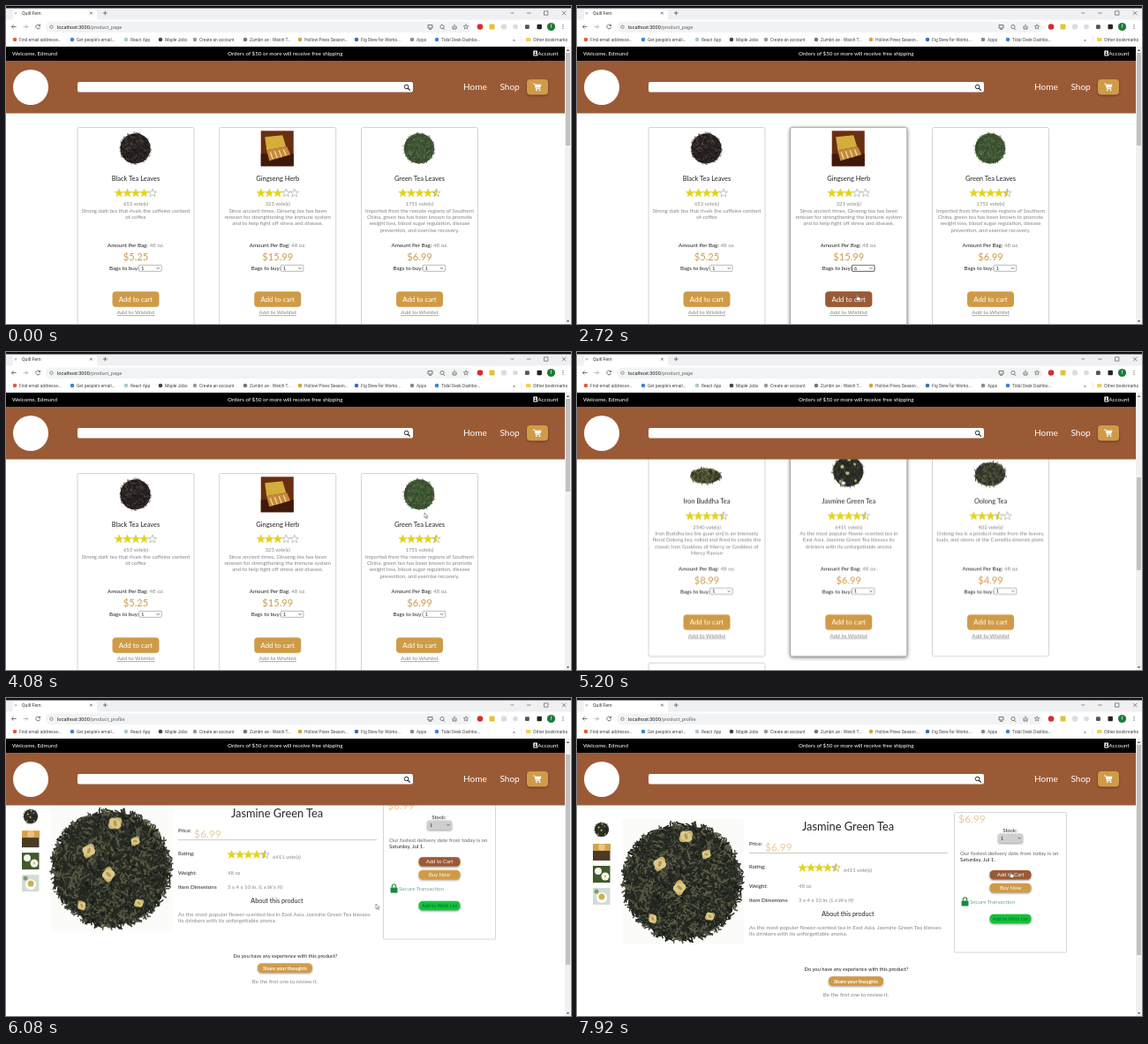
Write an HTML page that moves like this. It is 640 by 360 pixels and loops after 8 s.

```html
<!DOCTYPE html>
<html lang="en">
<head>
<meta charset="utf-8">
<title>Tea shop</title>
<style>
html, body { margin: 0; width: 100%; height: 100%; overflow: hidden; background: #fff; }
svg { display: block; width: 100vw; height: 100vh; font-family: Lato, sans-serif; }
.ui { font-family: Roboto, sans-serif; }
.shadow { filter: drop-shadow(0 1.2px 1.2px #0006); }
.lift { filter: drop-shadow(0 1px 2px #0008); }

/* 1% of the loop is 80 ms */
.scroll, .thumb, #cursor { animation: 8s linear infinite; }
.shop, .profile, .hover, .pick, .press, .arrow, .hand { animation: 8s step-end infinite; opacity: 0; }
.shop { animation-name: shop; }
.profile { animation-name: profile; }
.shop .scroll { animation-name: shop-scroll; }
.shop .thumb { animation-name: shop-thumb; }
.profile .scroll { animation-name: profile-scroll; }
.profile .thumb { animation-name: profile-thumb; }
.hover.ginseng { animation-name: hover-ginseng; }
.hover.green { animation-name: hover-green; }
.hover.jasmine { animation-name: hover-jasmine; }
.pick { animation-name: pick; }
.press { animation-name: press; }
.arrow { animation-name: arrow; }
.hand { animation-name: hand; }
#cursor { animation-name: cursor; }

@keyframes shop { 0% { opacity: 1 } 68%, 100% { opacity: 0 } }
@keyframes profile { 0% { opacity: 0 } 68%, 100% { opacity: 1 } }
@keyframes shop-scroll {
  0%, 54% { transform: translateY(0); animation-timing-function: ease-in-out }
  63%, 100% { transform: translateY(-266.5px) }
}
@keyframes shop-thumb {
  0%, 54% { transform: translateY(0); animation-timing-function: ease-in-out }
  63%, 100% { transform: translateY(89px) }
}
@keyframes profile-scroll {
  0%, 73% { transform: translateY(-80px) }
  76% { transform: translateY(-15px); animation-timing-function: ease-out }
  79%, 100% { transform: translateY(0) }
}
@keyframes profile-thumb {
  0%, 73% { transform: translateY(60px) }
  76% { transform: translateY(11px); animation-timing-function: ease-out }
  79%, 100% { transform: translateY(0) }
}
@keyframes hover-ginseng { 0% { opacity: 0 } 11% { opacity: 1 } 46%, 100% { opacity: 0 } }
@keyframes hover-green {
  0% { opacity: 0 } 8% { opacity: 1 } 9% { opacity: 0 }
  52% { opacity: 1 } 57%, 100% { opacity: 0 }
}
@keyframes hover-jasmine { 0% { opacity: 0 } 62%, 100% { opacity: 1 } }
@keyframes pick { 0% { opacity: 0 } 28% { opacity: 1 } 42%, 100% { opacity: 0 } }
@keyframes press { 0% { opacity: 0 } 32.5% { opacity: 1 } 43%, 100% { opacity: 0 } }
@keyframes arrow {
  0% { opacity: 0 } 3% { opacity: 1 } 32.5% { opacity: 0 } 43% { opacity: 1 }
  62% { opacity: 0 } 69% { opacity: 1 } 90%, 100% { opacity: 0 }
}
@keyframes hand {
  0% { opacity: 0 } 32.5% { opacity: 1 } 43% { opacity: 0 }
  62% { opacity: 1 } 69% { opacity: 0 } 90%, 100% { opacity: 1 }
}
@keyframes cursor {
  0%, 3% { transform: translate(600px, 140px) }
  6% { transform: translate(530px, 230px) }
  8% { transform: translate(440px, 280px) }
  9% { transform: translate(390px, 290px) }
  11% { transform: translate(365px, 294px) }
  15%, 31% { transform: translate(320px, 297px) }
  33%, 42% { transform: translate(317.5px, 327px) }
  50%, 54% { transform: translate(474px, 182px) }
  63%, 68.5% { transform: translate(300.5px, 144px) }
  72%, 84% { transform: translate(419px, 233px) }
  86%, 88% { transform: translate(490px, 163px) }
  91%, 94% { transform: translate(492px, 200px) }
  99%, 100% { transform: translate(491.5px, 197px) }
}
</style>
</head>
<body>
<svg id="stage" viewBox="0 0 640 360"></svg>
<script>
const BROWN = '#9b5a36', GOLD = '#d09b47', INK = '#222', GREY = '#858585';
const PITCH = 160.75, ROW = 240.5;

const text = (x, y, s, size = 6.1, fill = INK, attrs = '') =>
  `<text x="${x}" y="${y}" font-size="${size}" fill="${fill}" ${attrs}>${s}</text>`;
const mid = (x, y, s, size, fill, attrs = '') =>
  text(x, y, s, size, fill, `text-anchor="middle" ${attrs}`);
const lines = (write, x, y, rows, size, fill, step = 7.4) =>
  rows.map((s, i) => write(x, y + i * step, s, size, fill)).join('');
const rect = (x, y, w, h, fill, r = 0, attrs = '') =>
  `<rect x="${x}" y="${y}" width="${w}" height="${h}" rx="${r}" fill="${fill}" ${attrs}/>`;
const dot = (x, y, r, fill, attrs = '') =>
  `<circle cx="${x}" cy="${y}" r="${r}" fill="${fill}" ${attrs}/>`;
const path = (d, stroke = '#555', width = .8, fill = 'none') =>
  `<path d="${d}" stroke="${stroke}" stroke-width="${width}" fill="${fill}"/>`;
const group = (cls, body) => `<g class="${cls}">${body}</g>`;

function seeded(seed) {
  return () => (seed = (seed * 16807) % 2147483647) / 2147483647;
}

// A heap of leaves: random short strokes, centred inside a disc
function heap(cx, cy, rx, ry, colors, count, size, seed) {
  const rnd = seeded(seed);
  const base = `<ellipse cx="${cx}" cy="${cy}" rx="${rx * .95}" ry="${ry * .95}" fill="${colors[0]}"/>`;
  return base + colors.map(color => {
    let d = '';
    for (let i = 0; i < count / colors.length; i++) {
      const a = rnd() * 6.283, r = Math.sqrt(rnd()), b = rnd() * 6.283;
      const dx = size * Math.cos(b), dy = size * Math.sin(b);
      const x = cx + rx * r * Math.cos(a) - dx / 2, y = cy + ry * r * Math.sin(a) - dy / 2;
      d += `M${x.toFixed(1)} ${y.toFixed(1)}q${(dx / 2 - dy / 4).toFixed(1)} ${(dy / 2 + dx / 4).toFixed(1)} ${dx.toFixed(1)} ${dy.toFixed(1)}`;
    }
    return path(d, color, size / 4.5);
  }).join('');
}

const oval = (x, y, rx, ry, turn, fill) =>
  `<ellipse cx="${x}" cy="${y}" rx="${rx}" ry="${ry}" fill="${fill}" transform="rotate(${turn} ${x} ${y})"/>`;
const petal = (x, y, r) =>
  oval(x, y, r, r * .6, x * 7, '#c9b16c') + oval(x, y, r * .85, r * .6, x * 7 + 75, '#dcc888') +
  oval(x, y, r * .4, r * .2, x * 5, '#b39550');

const JASMINE = ['#2a2d26', '#171a16', '#3d4136', '#5a5b42', '#22261f'];
function jasmine(cx, cy, r, count, size) {
  const spots = [[-.38, -.3], [.4, -.46], [-.05, .1], [.46, .58], [.06, -.76], [-.5, .62]];
  return heap(cx, cy, r, r, JASMINE, count, size, 77) +
    spots.map(([x, y], i) => petal(cx + x * r, cy + y * r, r * (i % 2 ? .09 : .13))).join('');
}

function ginsengBox(cx, cy) {
  return rect(cx - 18.5, cy - 20, 37, 40, '#6a2e10') +
    rect(cx - 18.5, cy + 6, 37, 14, '#3f1a0b') +
    `<path d="M${cx - 14} ${cy - 13}l20-2 4 13-22 4z" fill="#d5ad3c"/>` +
    `<path d="M${cx - 12} ${cy + 2}l23-4 4 9-24 7z" fill="#c58a3c"/>` +
    path(`M${cx - 8} ${cy + 4}l3 8m2-9l3 8m2-9l3 8m2-9l3 7`, '#f0d698', 1.4);
}

const photos = [
  (x, y) => heap(x, y, 18, 18, ['#24201f', '#110f10', '#453631', '#5b504b'], 260, 3, 5),
  ginsengBox,
  (x, y) => heap(x, y, 18, 18, ['#3b5130', '#263a22', '#58704a', '#728563'], 280, 2.6, 9),
  (x, y) => heap(x - 1, y + 5, 18, 9, ['#3c4028', '#1f2417', '#60613a', '#7c7849'], 130, 4, 21),
  (x, y) => jasmine(x, y, 18, 240, 3),
  (x, y) => heap(x, y + 3, 18, 14, ['#34382a', '#1f231c', '#525643', '#6c6c50'], 150, 4, 33),
];

function starPath(cx, cy, r) {
  let d = '';
  for (let i = 0; i < 10; i++) {
    const a = (i / 5 - .5) * Math.PI, q = i % 2 ? r * .42 : r;
    d += `${i ? 'L' : 'M'}${(cx + q * Math.cos(a)).toFixed(2)} ${(cy + q * Math.sin(a)).toFixed(2)}`;
  }
  return d + 'z';
}
function stars(cx, cy, score) {
  return [0, 1, 2, 3, 4].map(i => {
    const left = score - i;
    const fill = left >= 1 ? '#e4d414' : left > 0 ? 'url(#half)' : '#fff';
    return path(starPath(cx + (i - 2) * 9.5, cy, 4.9), left >= 1 ? '#d8c814' : '#8a8a7a', .5, fill);
  }).join('');
}

const chevron = (x, y) => path(`M${x - 1.5} ${y - .8}l1.5 1.5 1.5-1.5`, '#333', .7);
const picker = (x, y, value, stroke = '#888') =>
  rect(x, y, 25.5, 7, '#fff', .8, `stroke="${stroke}" stroke-width=".6"`) +
  text(x + 2.5, y + 5.5, value, 5.4) + chevron(x + 21.5, y + 3.6);

const products = [
  { name: 'Black Tea Leaves', score: 4, votes: 653, price: '$5.25',
    about: ['Strong dark tea that rivals the caffeine content', 'of coffee'] },
  { name: 'Gingseng Herb', score: 3, votes: 323, price: '$15.99', hover: 'ginseng',
    about: ['Since ancient times, Ginseng tea has been', 'renown for strengthening the immune system', 'and to help fight off stress and disease.'] },
  { name: 'Green Tea Leaves', score: 4.5, votes: 1751, price: '$6.99', hover: 'green',
    about: ['Imported from the remote regions of Southern', 'China, green tea has been known to promote', 'weight loss, blood sugar regulation, disease', 'prevention, and exercise recovery.'] },
  { name: 'Iron Buddha Tea', score: 4.5, votes: 2540, price: '$8.99',
    about: ['Iron Buddha tea (tie guan yin) is an intensely', 'floral Oolong tea, rolled and fired to create the', 'classic Iron Goddess of Mercy or Goddess of', 'Mercy flavour'] },
  { name: 'Jasmine Green Tea', score: 4.5, votes: 6411, price: '$6.99', hover: 'jasmine',
    about: ['As the most popular flower-scented tea in', 'East Asia. Jasmine Green Tea blesses its', 'drinkers with its unforgettable aroma'] },
  { name: 'Oolong Tea', score: 3.5, votes: 402, price: '$4.99',
    about: ['Oolong tea is a product made from the leaves,', 'buds, and stems of the Camellia sinensis plant.'] },
];

const frame = (x, y, stroke = '#c8c8c8') =>
  rect(x, y, 132, 233, '#fff', 2, `stroke="${stroke}" stroke-width=".8"`);
const cartButton = (x, y, fill) =>
  rect(x - 26.5, y, 53, 17.5, fill, 4) + mid(x, y + 11.6, 'Add to cart', 7.8, '#fff');

function card(p, i) {
  const x = 81 + (i % 3) * PITCH, y = 137.5 + Math.floor(i / 3) * ROW, c = x + 66;
  return frame(x, y) +
    (p.hover ? group(`hover ${p.hover}`, group('lift', frame(x, y, '#aaa'))) : '') +
    photos[i](c - .5, y + 23.8) +
    mid(c, y + 60, p.name, 7.5) +
    stars(c, y + 74.3, p.score) +
    mid(c, y + 88.7, `${p.votes} vote(s)`, 5.8, GREY) +
    lines(mid, c, y + 96, p.about, 6.05, GREY) +
    mid(c, y + 135.7, `Amount Per Bag: <tspan fill="${GREY}">48 oz.</tspan>`, 6.2) +
    mid(c, y + 150.8, p.price, 11.2, GOLD) +
    text(c - 30, y + 161.5, 'Bags to buy:', 6.2) +
    picker(c + 3.7, y + 155.8, 1) +
    cartButton(c, y + 185.7, GOLD) +
    mid(c, y + 211.6, 'Add to Wishlist', 6.3, GREY, 'text-decoration="underline"') +
    (p.hover === 'ginseng'
      ? group('pick', picker(c + 3.7, y + 155.8, 6, '#111')) +
        group('press', cartButton(c, y + 185.7, BROWN))
      : '');
}

const thumb = h => group('thumb', rect(634, 53, 5, h, '#c1c1c1'));
const track = rect(633, 46, 7, 314, '#f1f1f1') +
  '<path d="M634.8 51l1.7-2 1.7 2zM634.8 356l1.7 2 1.7-2z" fill="#555"/>';
const pageUrl = name =>
  text(58, 25.8, `localhost:3000<tspan fill="#666">/${name}</tspan>`, 5.6, INK, 'class="ui"');

const pill = (x, y, w, h, fill, label, size, ink = '#fff', attrs = '') =>
  rect(x, y, w, h, fill, 4.5, 'class="shadow"') + mid(x + w / 2, y + h / 2 + size * .35, label, size, ink, attrs);

function gallery() {
  return jasmine(28, 149, 8.5, 110, 2) +
    rect(18, 165, 19.5, 19, '#4a3a26') + rect(18, 165, 19.5, 8, '#d9a04a') + dot(28, 169, 4, '#e8c27e') +
    rect(18, 190, 19.5, 19, '#3f5a2c') + dot(24, 196, 4, '#f4f4ea') + dot(32, 202, 4.5, '#f4f4ea') + dot(32, 202, 1.2, '#e0c040') +
    rect(18, 215, 19.5, 19, '#d3dcd2') + dot(28, 226, 6, '#fff') + dot(28, 225, 3.5, '#c9b04c') + dot(22, 219, 2.5, '#7e9c66') +
    rect(51, 137, 138, 142, '#fbfbf9') + jasmine(119.5, 208, 67.5, 2800, 6.5);
}

function details() {
  return mid(307, 150, 'Jasmine Green Tea', 12.8) +
    text(195, 167, 'Price:') + text(213, 172.5, '$6.99', 12, '#d8a25c', 'font-weight="300"') +
    path('M195 175.5H420', '#bbb', .8) +
    text(195, 193, 'Rating:') + stars(274.5, 192.3, 4.5) + text(302, 197, '6411 vote(s)', 5.9, GREY) +
    text(195, 215, 'Weight:') + text(251, 215, '48 oz', 6, GREY) +
    text(195, 231, 'Item Dimenions', 6.3) +
    text(251, 231, '3 x 4 x 10 in. <tspan font-style="italic">(L x W x H)</tspan>', 6, GREY) +
    mid(307, 247, 'About this product', 7.2) +
    lines(text, 195, 262, ['As the most popular flower-scented tea in East Asia. Jasmine Green Tea blesses', 'its drinkers with its unforgettable aroma.'], 6.3, GREY) +
    mid(316.5, 309.3, 'Do you have any experience with this product?', 5.75) +
    pill(285, 315.3, 62, 10.5, GOLD, 'Share your thoughts', 5.6, '#fff', 'font-weight="700"') +
    mid(316, 338.3, 'Be the first one to review it.', 6.1, GREY);
}

function buyBox() {
  return rect(427.5, 129.5, 127, 158.5, '#fff', 1, 'stroke="#c4c4c4" stroke-width=".7"') +
    text(432, 141, '$6.99', 12, '#d8a25c', 'font-weight="300"') +
    mid(490.5, 151.8, 'Stock:', 6.2) +
    rect(477, 153.5, 28, 10.5, '#cfcfcf', 2.5, 'class="shadow"') + text(480, 160.7, '1', 5.5) + chevron(501, 158.7) +
    text(434, 178, 'Our fastest delivery date from today is on', 6.15, '#666') +
    text(434, 185.4, 'Saturday, Jul 1.', 6.1) +
    pill(467.5, 195, 47, 10.5, BROWN, 'Add to Cart', 6) +
    pill(467.5, 209.8, 47, 10.5, GOLD, 'Buy Now', 6) +
    rect(435.5, 229.5, 8, 6, '#168a3c', .8) + path('M437.3 229.5v-1.6a2.2 2.2 0 0 1 4.4 0v1.6', '#168a3c', 1.1) +
    text(445, 233.3, 'Secure Transaction', 6.2, '#6fa596') +
    pill(467.5, 244.7, 47, 10.5, '#12c33c', 'Add to Wish List', 5.6, '#0a6b22');
}

function footer() {
  const column = (x, head, rows) =>
    text(x, 397.3, head, 6.5, '#fff', 'font-weight="700"') + lines(text, x, 413, rows, 6.2, '#fff');
  return rect(0, 383, 640, 70, '#000') +
    column(7, 'Information', ['About Us', 'Careers', 'Site Map']) +
    column(114, 'Customer Service', ['Refund and Return Policy', 'Privacy Policy', 'Terms of Service', 'Order History']) +
    column(222, 'Contact Us', ['P.O. Box 3862 &#160;Larkmere, CA', '00417', '<tspan font-weight="700">Email us</tspan>', 'info@QuillFern.com']) +
    column(351, 'Spread the word about us', []) +
    [347, 377, 407.5, 438].map(x => dot(x, 412, 4, '#fff')).join('') +
    column(465.5, 'Get the latest news about our offers', ['Subscribe to our newsletter.']) +
    rect(466, 415.8, 78, 15, '#fff', 0, 'stroke="#aaa" stroke-width="1.2"') +
    text(468.5, 425, 'Type your email here', 5.2, GREY) + dot(537, 423, 3, 'none', 'stroke="#bbb" stroke-width=".8"') +
    rect(549, 414.3, 42, 17.5, GOLD, 4) + mid(570, 426, 'Subscribe', 8, '#fff');
}

const tabBar = rect(0, 0, 640, 16, '#eff0f2') +
  '<path d="M5 16q3 0 3-3V6q0-2 2-2h91q2 0 2 2v7q0 3 3 3z" fill="#fff"/>' +
  rect(0, 0, 640, 2.5, '#111') +
  text(18, 10, 'Quill Fern', 5.2, '#333') + dot(11, 8, 1.6, '#ccc') +
  path('M95 6.7l2.8 2.8m0-2.8l-2.8 2.8M110 8h4.6m-2.3-2.3v4.6') +
  path('M571.5 7l1.8 1.8 1.8-1.8M590 8h4.5M609.5 5.8h4.4v4.4h-4.4zM630 5.8l4.4 4.4m0-4.4l-4.4 4.4', '#444', .6);

const toolbar = rect(0, 15.5, 640, 30.5, '#fff') +
  rect(45, 17.5, 482, 12.5, '#f1f3f4', 6) +
  path('M11.5 23.5h-5m2-2.2l-2.2 2.2 2.2 2.2') +
  path('M19.5 23.5h5m-2-2.2l2.2 2.2-2.2 2.2', '#aaa') +
  path('M38.3 22.2a2.4 2.4 0 1 0 .2 2M38.6 20.6v2h-2') +
  dot(51.5, 23.7, 1.7, 'none', 'stroke="#555" stroke-width=".6"') +
  path('M478 21.5h5v3.5h-5zM479 26.3h3M495.3 25.2l1.7 1.7M506 22.5v3.5h4v-3.5M508 24.5v-4') +
  dot(494, 23.5, 2.1, 'none', 'stroke="#555" stroke-width=".7"') +
  path(starPath(521, 23.6, 2.9), '#555', .6) +
  dot(537, 23.5, 3.3, '#d92d2d') + rect(547.5, 20.5, 6, 6, '#e3c22f', 1) +
  dot(564, 23.5, 3.2, '#d9dde2') + dot(577, 23.5, 2.8, '#d9dde2') +
  rect(588, 21.2, 4.8, 4.8, '#555', 1) + rect(601.5, 20.8, 5.4, 5.4, '#222', 1) +
  dot(617.5, 23.5, 4.6, '#1c7c35') + mid(617.5, 25.4, 'f', 5.5, '#fff') +
  [21.5, 23.5, 25.5].map(y => dot(631, y, .6, '#444')).join('');

const bookmarks = [
  [15, 'Find email addresse...', '#e8593a'], [80, "Get people's email...", '#3b86d8'],
  [141, 'React App', '#a9c9d2'], [180, 'Maple Jobs', '#444'],
  [219, 'Create an account', '#9a9a9a'], [276, 'Zumbri.se - Watch T...', '#777'],
  [338, 'Hollow Pines Season...', '#d4a23c'], [402, 'Fig Stew for Worko...', '#3d6fb5'],
  [465, 'Apps', '#8b8b8b'], [493, 'Tidal Desk Dashbo...', '#3b82e0'],
].map(([x, label, color]) => dot(x - 5, 38, 2.3, color) + text(x, 39.8, label, 4.9, '#444')).join('') +
  text(574, 39.8, '»', 6, '#444') + path('M584 34.5v7', '#ccc', .5) +
  rect(589, 36, 5.5, 4, '#f2cd60', .6) + text(597, 39.8, 'Other bookmarks', 5.1, '#444');

const banner = rect(0, 46, 633, 16.5, '#000') +
  text(7, 56.2, 'Welcome, Edmund', 6.2, '#fff') +
  mid(316.3, 56.2, 'Orders of $50 or more will receive free shipping', 6.25, '#fff') +
  rect(597.3, 50.5, 4.6, 6, '#fff', .5) + dot(599.6, 52.5, .9, '#000') + rect(598.3, 54, 2.6, 1.5, '#000', .6) +
  text(602.3, 56.2, 'Account', 6.4, '#fff');

const header = rect(0, 62, 633, 59.5, BROWN) +
  dot(28, 92, 20, '#fff') +
  rect(81, 86, 380, 11.5, '#fff', 2) +
  dot(453.6, 91.5, 2.3, 'none', 'stroke="#111" stroke-width=".9"') + path('M455.3 93.2l2.4 2.4', '#111', 1.1) +
  text(518, 95, 'Home', 10, '#fff') + text(559.5, 95, 'Shop', 10, '#fff') +
  rect(590, 83, 24, 17.5, GOLD, 4, 'class="shadow"') +
  path('M597 88h1.8l1.5 5.5h4.8', '#fff', .9) + '<path d="M599.3 88.8h7.2l-1.2 3.8h-5z" fill="#fff"/>' +
  dot(600.8, 95.2, .9, '#fff') + dot(604.6, 95.2, .9, '#fff');

const cursor = `<g id="cursor" fill="#fff" stroke="#444" stroke-width=".5">
  <path class="arrow" d="M0 0v5.8l1.4-1.2 1 2.2.9-.4-1-2.1h1.8z"/>
  <path class="hand" d="M-.6 0q.6-.8 1.2 0v2.3l2.3.6q.8.3.6 1.2l-.6 2.5H0l-2-2.6q0-.8.8-.4l.6.5z"/>
</g>`;

document.getElementById('stage').innerHTML =
  `<defs><linearGradient id="half"><stop offset=".5" stop-color="#e4d414"/><stop offset=".5" stop-color="#fff"/></linearGradient></defs>` +
  group('shop', group('scroll', products.map(card).join('') + frame(81, 137.5 + 2 * ROW))) +
  group('profile', group('scroll', gallery() + details() + buyBox() + footer())) +
  banner + header + track +
  group('shop', thumb(105)) + group('profile', thumb(238)) +
  group('ui', tabBar + toolbar + bookmarks) +
  group('shop', pageUrl('product_page')) + group('profile', pageUrl('product_profile')) +
  cursor;
</script>
</body>
</html>
```
